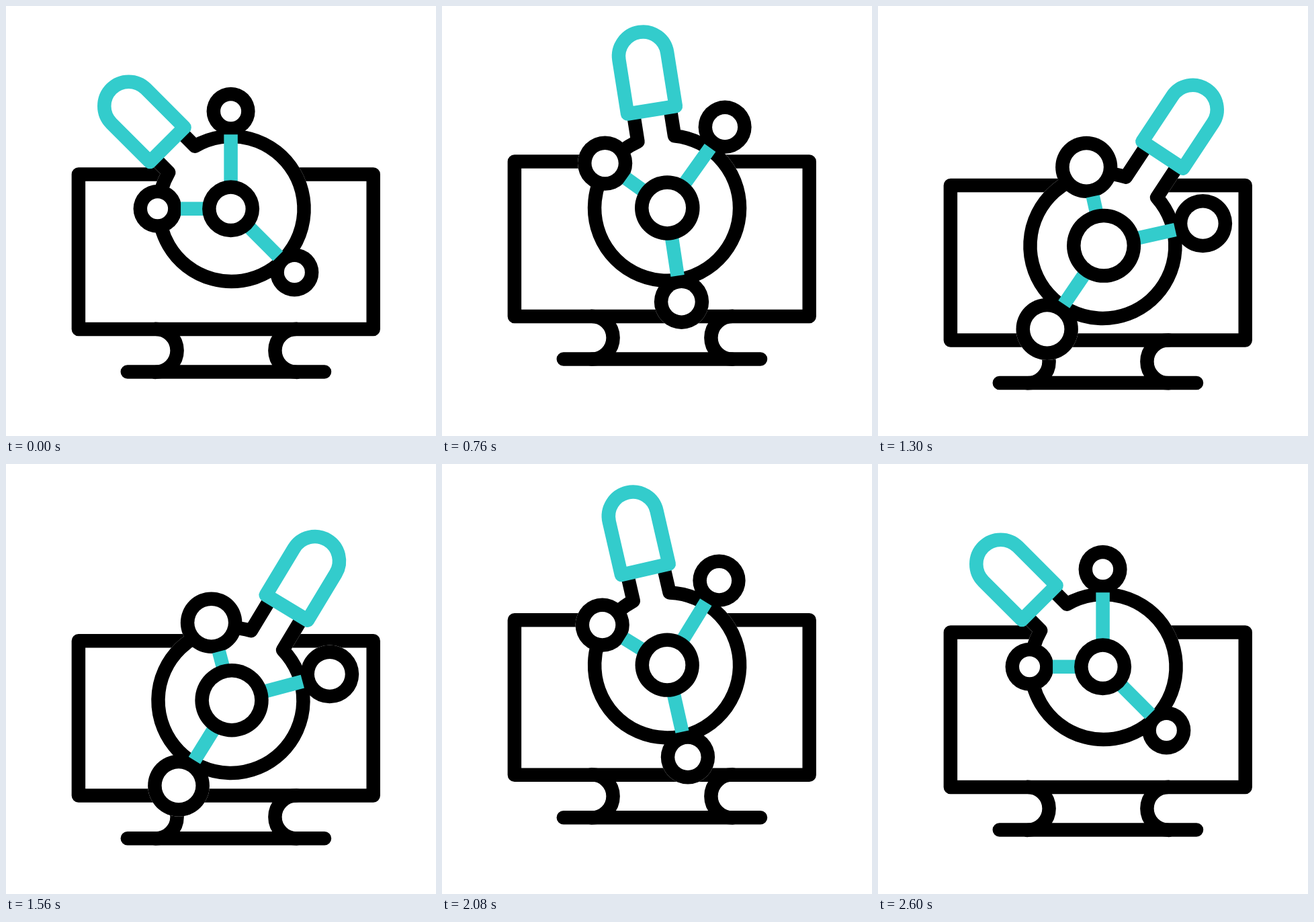
Recreate the animation shown at these times as an HTML page with a canvas. Size 640 by 640 pixels, loop 2820 ms.

```html
<!DOCTYPE html>
<html lang="en">
<head>
<meta charset="utf-8">
<title>Molecule under a magnifier</title>
<style>
  html, body { margin: 0; width: 100%; height: 100%; overflow: hidden; background: #fff; }
  canvas { display: block; }
</style>
</head>
<body>
<canvas id="stage" width="640" height="640"></canvas>
<script>
const ctx = document.getElementById('stage').getContext('2d');
const BLACK = '#000', TEAL = '#33cccc', WHITE = '#fff';
const LINE = 20.5, LOOP = 2820, STEP = 20, START = 200, HALF = 1200;
const TAU = Math.PI * 2, DEG = Math.PI / 180;
const BOB = 19.3;
const RING = 108, FOOT_X = 27.6, FOOT_Y = -104.3;
const GRIP = 36.3, GRIP_BASE = -135.3, GRIP_TOP = -216.4, GRIP_SLIDE = 27.3;

// Pairs are [at rest, fully swung]; radii are outer radii.
const NODES = [
  { angle: [-90, -11.1], dist: [145, 151.2], radius: [36, 43.8] },
  { angle: [180, 259.1], dist: [109, 120], radius: [36, 46.3] },
  { angle: [45, 125.8], dist: [134, 150.4], radius: [36, 46.4] }
];
const HUB_RADIUS = [42.5, 55.3];

const mix = ([a, b], p) => a + (b - a) * p;
const ease = s => s * s * (3 - 2 * s);

function stroke(color, cap = 'round') {
  ctx.strokeStyle = color;
  ctx.lineCap = cap;
  ctx.stroke();
}

function fill(color) {
  ctx.fillStyle = color;
  ctx.fill();
}

function disc(x, y, r, color) {
  ctx.beginPath();
  ctx.arc(x, y, r, 0, TAU);
  fill(color);
}

function node({ x, y, r }) {
  disc(x, y, r, BLACK);
  disc(x, y, r - LINE, WHITE);
}

function monitor(dy) {
  ctx.save();
  ctx.translate(0, dy);
  ctx.beginPath();
  ctx.rect(107.9, 250.6, 438.8, 230.4);
  ctx.moveTo(180.8, 544.6);
  ctx.lineTo(474, 544.6);
  stroke(BLACK);
  ctx.beginPath();
  ctx.arc(222.5, 512.8, 32.1, -Math.PI / 2, Math.PI / 2);
  stroke(BLACK);
  ctx.beginPath();
  ctx.arc(432.5, 512.8, 32.1, Math.PI / 2, Math.PI * 1.5);
  stroke(BLACK);
  ctx.restore();
}

function lensPath(neckEnd) {
  const open = Math.atan2(FOOT_Y, FOOT_X);
  ctx.beginPath();
  ctx.moveTo(FOOT_X, neckEnd);
  ctx.arc(0, 0, RING, open, Math.PI - open);
  ctx.lineTo(-FOOT_X, neckEnd);
}

function handle(slide) {
  ctx.beginPath();
  ctx.moveTo(-GRIP, GRIP_BASE - slide);
  ctx.arc(0, GRIP_TOP - slide, GRIP, Math.PI, 0);
  ctx.lineTo(GRIP, GRIP_BASE - slide);
  ctx.closePath();
  fill(WHITE);
  stroke(TEAL);
}

function magnifier(x, y, p, nodes) {
  const slide = GRIP_SLIDE * p;
  ctx.save();
  ctx.translate(x, y);
  ctx.rotate((-45 + 80 * p) * DEG);
  lensPath(GRIP_BASE - slide);
  fill(WHITE);
  stroke(WHITE, 'butt');
  ctx.restore();

  // Knock the nodes out of the monitor before the lens is inked.
  nodes.forEach(n => disc(n.x, n.y, n.r, WHITE));

  ctx.save();
  ctx.translate(x, y);
  ctx.rotate((-45 + 80 * p) * DEG);
  lensPath(GRIP_BASE - slide);
  stroke(BLACK, 'butt');
  handle(slide);
  ctx.restore();
}

function link(hub, n) {
  const reach = n.dist - n.r + 1.5;
  ctx.beginPath();
  ctx.moveTo(hub.x, hub.y);
  ctx.lineTo(hub.x + Math.cos(n.angle) * reach, hub.y + Math.sin(n.angle) * reach);
  stroke(TEAL, 'butt');
}

function draw(time) {
  const t = Math.floor(time / STEP) * STEP;
  const phase = Math.min(2, Math.max(0, (t - START) / HALF));
  const u = phase > 1 ? 2 - phase : phase;
  const p = ease(u);
  const bob = u < 0.5 ? -BOB * ease(u * 2) : BOB * (2 * ease(u * 2 - 1) - 1);
  const y = mix([302, 341.3], p) + bob;

  const hub = { x: mix([334.6, 336.1], p), y: y - 0.2, r: mix(HUB_RADIUS, p) };
  const nodes = NODES.map(n => {
    const angle = mix(n.angle, p) * DEG, dist = mix(n.dist, p);
    return {
      angle, dist, r: mix(n.radius, p),
      x: hub.x + Math.cos(angle) * dist,
      y: hub.y + Math.sin(angle) * dist
    };
  });

  ctx.fillStyle = WHITE;
  ctx.fillRect(0, 0, 640, 640);
  ctx.lineWidth = LINE;
  ctx.lineJoin = 'round';
  monitor(bob);
  magnifier(mix([335.6, 334.4], p), y, p, nodes);
  nodes.forEach(node);
  nodes.forEach(n => link(hub, n));
  node(hub);
}

const begin = performance.now();
function tick() {
  draw((performance.now() - begin) % LOOP);
  requestAnimationFrame(tick);
}
tick();
</script>
</body>
</html>
```
